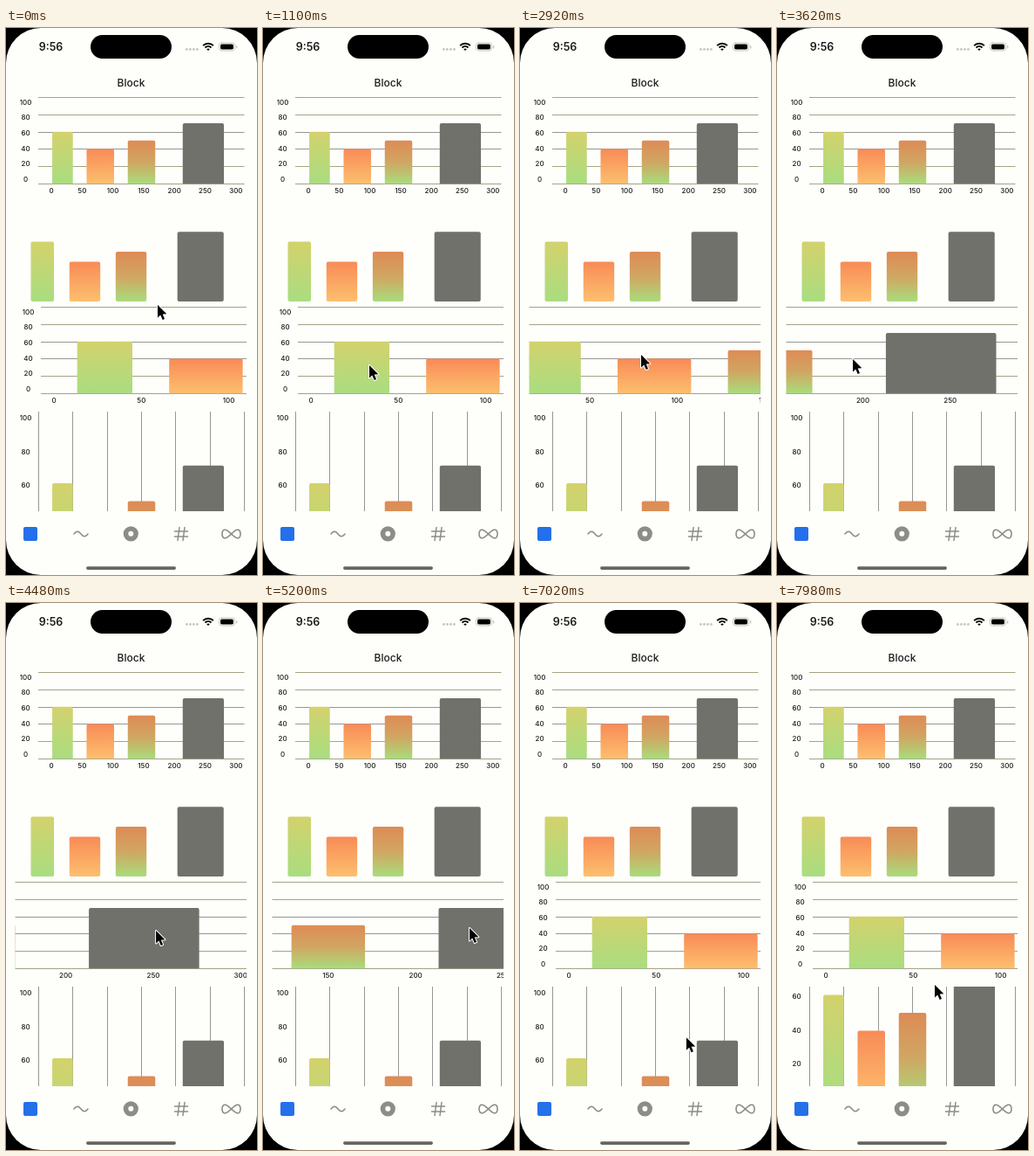
Write an HTML page with a canvas that moves like this. It is 288 px wide and 626 px high and loops after 8000 ms.

```html
<!DOCTYPE html>
<html lang="en">
<head>
<meta charset="utf-8">
<title>Block</title>
<style>
html, body { margin: 0; width: 100%; height: 100%; overflow: hidden; background: #000; }
canvas { display: block; width: 288px; height: 626px; }
</style>
</head>
<body>
<canvas id="stage"></canvas>
<script>
const W = 288, H = 626, LOOP = 8000;
const canvas = document.getElementById('stage');
const ctx = canvas.getContext('2d');
const ratio = window.devicePixelRatio || 1;
canvas.width = W * ratio;
canvas.height = H * ratio;

const PAPER = '#fefefb', INK = '#1c1c1c', ICON = '#8c8c88', FAINT = '#c4c4c0';
const RULE = '#a5a387', GREY_RULE = '#969694';

// Chart data: start and size on a 0-300 axis, value on a 0-100 axis
const BARS = [
  { at: 20, size: 30, value: 60, colors: ['#d3d26c', '#a9dd80'] },
  { at: 70, size: 40, value: 40, colors: ['#f88b57', '#fdbf6e'] },
  { at: 130, size: 40, value: 50, colors: ['#de8b55', '#d0a662', '#a9dc7c'] },
  { at: 210, size: 60, value: 70, colors: ['#71716c', '#71716c'] },
];

// Pointer stops: time, x, y
const STOPS = [[0, 174, 317], [1100, 122, 386], [2500, 213, 374], [2920, 139, 374],
  [3620, 87, 379], [5200, 237, 372], [6180, 207, 444], [7500, 184, 520], [7980, 181, 437]];

function ease(t, from, to) {
  const u = Math.min(1, Math.max(0, (t - from) / (to - from)));
  return u * u * (3 - 2 * u);
}

const scrollX = t => -398 * ease(t, 2550, 3884) + 399 * ease(t, 4215, 6968);
const scrollY = t => -72.5 * ease(t, 7540, 7980);

function pointerAt(t) {
  const i = Math.max(1, STOPS.findIndex(s => s[0] > t));
  const [a, b] = t >= STOPS.at(-1)[0] ? STOPS.slice(-2) : [STOPS[i - 1], STOPS[i]];
  const u = ease(t, a[0], b[0]);
  return [a[1] + (b[1] - a[1]) * u, a[2] + (b[2] - a[2]) * u];
}

function text(str, x, y, size = 8, weight = 500) {
  ctx.font = `${weight} ${size}px Inter, "Liberation Sans", sans-serif`;
  ctx.textAlign = 'center';
  ctx.fillStyle = INK;
  ctx.fillText(str, x, y + size * 0.36);
}

function box(x, y, w, h, r, color) {
  ctx.fillStyle = color;
  ctx.beginPath();
  ctx.roundRect(x, y, w, h, r);
  ctx.fill();
}

function stroke(color, width, path) {
  ctx.strokeStyle = color;
  ctx.lineWidth = width;
  ctx.lineCap = ctx.lineJoin = 'round';
  ctx.beginPath();
  path();
  ctx.stroke();
}

function clipped(x, y, w, h, draw) {
  ctx.save();
  ctx.beginPath();
  ctx.rect(x, y, w, h);
  ctx.clip();
  draw();
  ctx.restore();
}

function bars(x, scaleX, base, scaleY, radius = [2, 2, 0, 0]) {
  for (const { at, size, value, colors } of BARS) {
    const top = base - value * scaleY;
    const fill = ctx.createLinearGradient(0, top, 0, base);
    colors.forEach((c, i) => fill.addColorStop(i / (colors.length - 1), c));
    box(x + at * scaleX, top, size * scaleX, value * scaleY, radius, fill);
  }
}

function rules(x, top, right) {
  for (let i = 0; i < 6; i++) {
    ctx.fillStyle = i === 2 || i === 3 ? GREY_RULE : RULE;
    ctx.fillRect(x, Math.round(top + i * 19.8), right - x, 1);
  }
}

function yLabels(x, top, step) {
  for (let i = 0; i < 6; i++) text(100 - i * 20, x, top + i * step);
}

function xLabels(x, y, step) {
  for (let i = 0; i < 7; i++) text(i * 50, x + i * step, y);
}

function topChart() {
  rules(37, 79, 273.5);
  yLabels(22.5, 85, 17.6);
  xLabels(52, 186, 35.3);
  bars(37.3, 0.788, 178.2, 0.99);
}

function wideChart(dx) {
  clipped(10.5, 315, 265.5, 117, () => {
    rules(Math.max(10, 40 + dx), 319, 276);
    yLabels(25.5 + dx, 325, 17.6);
    xLabels(55 + dx, 426, 100.3);
    bars(39.5 + dx, 2.11, 418.2, 0.99);
  });
}

function tallChart(dy) {
  clipped(10, 439, 266, 114, () => {
    ctx.fillStyle = GREY_RULE;
    for (let i = 0; i < 7; i++) ctx.fillRect(Math.floor(37.3 + i * 39.4), 439, 1, 114);
    yLabels(22.5, 446.5 + dy, 38.3);
    bars(37.3, 0.788, 643.5 + dy, 2.04);
  });
}

function statusBar() {
  text('9:56', 51.5, 21.5, 12.5, 600);
  box(97, 8, 93, 27, 13.5, '#000');
  for (let i = 0; i < 4; i++) box(206 + i * 4, 23, 2.8, 2.8, 1.4, FAINT);
  ctx.strokeStyle = '#000';
  ctx.lineWidth = 2;
  ctx.lineCap = 'butt';
  for (const r of [1.5, 4.9, 8.3]) {
    ctx.beginPath();
    ctx.arc(232, 26, r, -Math.PI * 0.75, -Math.PI * 0.25);
    ctx.stroke();
  }
  stroke(FAINT, 1, () => ctx.roundRect(244.5, 17, 18, 9, 3));
  box(246, 18.5, 15, 6, 1.8, '#000');
  box(264, 20, 1.3, 3.4, 0.6, FAINT);
}

function tabBar() {
  box(20, 571, 16, 16, 2, '#2470ea');
  stroke(ICON, 1.6, () => {
    for (let x = -8; x <= 8; x++) ctx.lineTo(86 + x, 579 - 2.8 * Math.sin(-x * Math.PI / 8));
  });
  box(134.7, 570.2, 17.2, 17.2, 8.6, ICON);
  box(140.3, 575.8, 6, 6, 3, PAPER);
  stroke(ICON, 1.5, () => {
    for (const d of [-3, 3]) {
      ctx.moveTo(193.5, 579 + d);
      ctx.lineTo(208.5, 579 + d);
      ctx.moveTo(202 + d, 571.5);
      ctx.lineTo(200 + d, 586.5);
    }
  });
  stroke(ICON, 1.6, () => {
    for (let a = 0; a <= 6.3; a += 0.1) {
      ctx.lineTo(258.5 + 10.5 * Math.cos(a), 579 + 4.8 * Math.sin(2 * a));
    }
  });
  box(92, 616.3, 103, 3.6, 1.8, '#66665c');
}

function pointer([x, y]) {
  const arrow = new Path2D('M0 0V14.5L3.3 11.5L5.7 17L8 16L5.7 10.6L10.3 10.3Z');
  ctx.translate(x, y);
  ctx.strokeStyle = '#fff';
  ctx.lineWidth = 2;
  ctx.stroke(arrow);
  ctx.fillStyle = '#000';
  ctx.fill(arrow);
}

function draw(t) {
  ctx.setTransform(ratio, 0, 0, ratio, 0, 0);
  ctx.fillStyle = '#000';
  ctx.fillRect(0, 0, W, H);
  box(0, 0, W, H, 40, PAPER);
  statusBar();
  text('Block', 143.5, 62.5, 12);
  topChart();
  bars(10.8, 0.885, 313, 1.14, 2);
  wideChart(scrollX(t));
  tallChart(scrollY(t));
  tabBar();
  pointer(pointerAt(t));
}

function tick() {
  draw(performance.now() % LOOP);
  requestAnimationFrame(tick);
}
tick();
</script>
</body>
</html>
```
